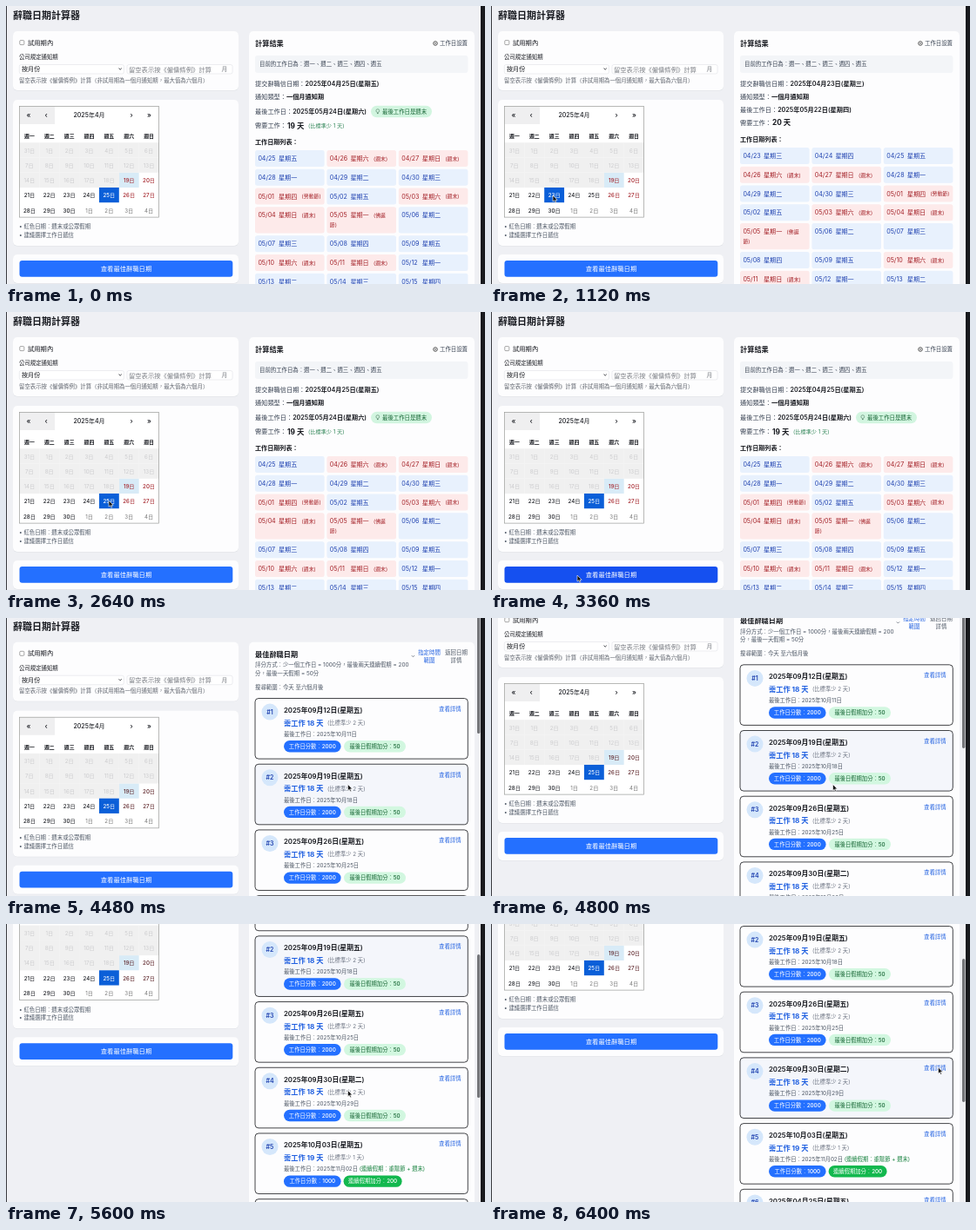
An HTML page that plays this animation: 550 by 320 pixels, repeating every 6.48 s.

```html
<!DOCTYPE html>
<html lang="zh-Hant">
<head>
<meta charset="utf-8">
<style>
html, body { margin: 0; width: 100%; height: 100%; overflow: hidden; background: #eff0f4; }
svg { display: block; width: 550px; height: 320px; font-family: Inter, "Noto Sans CJK TC", "Noto Sans CJK HK", "Noto Sans CJK JP", "Noto Sans CJK", sans-serif; }
text { white-space: pre; }
</style>
</head>
<body>
<svg id="stage" viewBox="0 0 550 320"></svg>
<script>
const LOOP = 6480, STEP = 80;
const INK = '#17191f', GREY = '#4b5563', BLUE = '#2470ff', LINK = '#1f5fe0', GREEN = '#166534', NAVY = '#1e40af', RED = '#a32027';
const stage = document.getElementById('stage');

function add(parent, tag, attrs = {}) {
  const node = document.createElementNS('http://www.w3.org/2000/svg', tag);
  for (const key in attrs) node.setAttribute(key, attrs[key]);
  parent.appendChild(node);
  return node;
}
const group = (parent, attrs) => add(parent, 'g', attrs);
const rect = (parent, x, y, width, height, fill, rx = 0, more = {}) =>
  add(parent, 'rect', { x, y, width, height, fill, rx, ...more });

// cy is the middle of the line; content is a string or a list of [string, attrs] runs.
function text(parent, x, cy, size, content, fill = INK, weight = 400, anchor = 'start') {
  const node = add(parent, 'text', { x, y: cy + size * 0.37, 'font-size': size, 'font-weight': weight, 'text-anchor': anchor });
  if (fill) node.setAttribute('fill', fill);
  if (typeof content === 'string') node.textContent = content;
  else for (const [run, attrs] of content) add(node, 'tspan', attrs).textContent = run;
  return node;
}

function panel(parent, x, y, w, h) {
  rect(parent, x, y + 0.6, w, h, '#dfe1e6', 5);
  rect(parent, x, y, w, h, '#fdfdfe', 5);
}

rect(stage, 0, 0, 550, 320, '#eff0f4');
const page = group(stage);
text(page, 8, 11, 11, '辭職日期計算器', INK, 700);

// Notice form
panel(page, 8, 29, 259, 68);
rect(page, 15.8, 39.6, 5, 5, '#fff', 1, { stroke: '#6b6b6b', 'stroke-width': 0.6 });
text(page, 25, 42, 7.3, '試用期內');
text(page, 15, 59, 6.4, '公司規定通知期', INK, 500);
const field = { stroke: '#d9dbe0', 'stroke-width': 0.5 };
rect(page, 15.3, 67.5, 120, 10.5, '#fff', 2, field);
rect(page, 139, 67.5, 121, 10.5, '#fff', 2, field);
text(page, 18, 72.7, 7.1, '按月份', INK, 500);
add(page, 'path', { d: 'M129.6 71.6l1.6 1.6 1.6-1.6', fill: 'none', stroke: INK, 'stroke-width': 0.8 });
text(page, 141, 72.9, 7.3, '留空表示按《僱傭條例》計算', '#7b7e85');
text(page, 247.5, 72.9, 6.8, '月', '#7b7e85');
text(page, 15, 85.2, 6.4, '留空表示按《僱傭條例》計算（非試用期為一個月通知期，最大值為六個月）', '#5f646d');

// Calendar
const COL = 160 / 7, ROW = 17.25, GRID_TOP = 157.2;
panel(page, 8, 108, 259, 168);
rect(page, 15.5, 115.5, 160, 127.6, '#fff');
rect(page, 15.5, 115.5, 40.5, 20.5, '#efeff0');
[['«', 26], ['‹', 46], ['›', 144], ['»', 164.5]].forEach(([mark, x]) => text(page, x, 125, 8, mark, INK, 500, 'middle'));
text(page, 95.5, 125.5, 7, '2025年4月', INK, 500, 'middle');
const colX = c => 15.5 + (c + 0.5) * COL;
[...'一二三四五六日'].forEach((d, c) => text(page, colX(c), 150, 5.9, '週' + d, INK, 700, 'middle'));
const redDays = group(page);
for (let i = 0; i < 35; i++) {
  const c = i % 7, r = Math.floor(i / 7), x = 15.5 + c * COL, y = GRID_TOP + r * ROW;
  const day = i === 0 ? 31 : i > 30 ? i - 30 : i;
  const off = i < 19, red = [19, 20, 26, 27].includes(i);
  if (off) rect(page, x, y, COL + 0.1, ROW + 0.1, '#f0f0f0');
  if (i === 19) rect(redDays, x, y, COL, ROW, '#d8ebf7');
  text(red ? redDays : page, colX(c), y + ROW / 2 + 0.4, 6.2, day + '日',
    red ? null : off ? '#cbcbcd' : i > 30 ? '#777' : INK, i > 30 || off ? 400 : 500, 'middle');
}
const picked = group(page);
rect(picked, 0, GRID_TOP + 3 * ROW, COL, ROW, '#0b5fd8');
const pickedText = text(picked, COL / 2, GRID_TOP + 3.5 * ROW + 0.4, 6.2, '25日', '#fff', 500, 'middle');
rect(page, 15.5, 115.5, 160, 127.6, 'none', 0, { stroke: '#9a9c99', 'stroke-width': 0.7 });
text(page, 15, 254, 6.4, '• 紅色日期：週末或公眾假期', GREY);
text(page, 15, 263.5, 6.4, '• 建議選擇工作日遞信', GREY);

panel(page, 8, 286, 259, 33);
const button = rect(page, 15.5, 293, 244.8, 18.7, BLUE, 3);
text(page, 138, 302.4, 7.3, '查看最佳辭職日期', '#fff', 500, 'middle');

panel(page, 279, 29, 259, 620);

function buildResult(startDay, lastDay, days, saving) {
  const g = group(page), shift = saving ? 3.4 : 0;
  const line = (y, label, value) => text(g, 286, y, 7.2, [[label, { fill: '#374151' }], [value, { 'font-weight': 600 }]]);
  text(g, 286, 43, 8.2, '計算結果', INK, 700);
  add(g, 'circle', { cx: 493, cy: 43, r: 2.3, fill: 'none', stroke: '#444', 'stroke-width': 0.9 });
  add(g, 'circle', { cx: 493, cy: 43, r: 0.8, fill: '#444' });
  text(g, 498, 43, 6.4, '工作日設置', '#374151');
  rect(g, 286, 57, 244.5, 20, '#f3f5f8', 3);
  text(g, 291, 67, 6.4, '目前的工作日為：週一、週二、週三、週四、週五', '#374151');
  line(89.5, '提交辭職信日期：', startDay);
  line(104.3, '通知類型：', '一個月通知期');
  line(saving ? 121.3 : 119, '最後工作日：', lastDay);
  if (saving) {
    rect(g, 419, 114.8, 70, 13.4, '#d2f5e0', 6.7);
    add(g, 'circle', { cx: 426.8, cy: 120.6, r: 1.9, fill: 'none', stroke: '#5d8a70', 'stroke-width': 0.7 });
    rect(g, 426, 123, 1.6, 1.1, '#5d8a70');
    text(g, 432, 121.3, 6.4, '最後工作日是週末', GREEN);
  }
  const workY = 134.3 + shift;
  text(g, 286, workY, 7.2, '需要工作：', '#374151');
  text(g, 323, workY, 8.3, days + ' 天', INK, 700);
  if (saving) text(g, 347, workY, 6.2, '(比標準少 1 天)', '#2f8556');
  text(g, 286, 153 + shift, 7.1, '工作日期列表：', INK, 600);

  const first = Number(startDay.slice(8, 10));
  let y = 163 + shift * 0.9;
  for (let r = 0; r < 8; r++) {
    let tall = false;
    const cells = [0, 1, 2].map(c => {
      const n = first + r * 3 + c, may = n > 30, day = may ? n - 30 : n;
      const week = (n - 20 + 7) % 7;
      const label = `${may ? '05' : '04'}/${String(day).padStart(2, '0')}`;
      const note = may && day === 1 ? '(勞動節)' : may && day === 5 ? '(佛誕' : week === 0 || week === 6 ? '(週末)' : '';
      if (note === '(佛誕') tall = true;
      return { x: 286 + c * 82.4, label, week, note };
    });
    const h = tall ? 30.2 : 19;
    for (const { x, label, week, note } of cells) {
      const fill = note ? RED : NAVY;
      rect(g, x, y, 79.6, h, note ? '#fdeaea' : '#e8f1fd', 2.5);
      text(g, x + 3.4, y + 9.5, 7.1, label, fill);
      text(g, x + 27, y + 9.5, 7.1, '星期' + '日一二三四五六'[week], fill, 500);
      if (note) text(g, x + 53.6, y + 9.7, 5.9, note, fill);
      if (note === '(佛誕') text(g, x + 3.4, y + 20.5, 5.9, '節)', fill);
    }
    y += h + 2.75;
  }
  return g;
}
const results = {
  25: buildResult('2025年04月25日(星期五)', '2025年05月24日(星期六)', 19, true),
  23: buildResult('2025年04月23日(星期三)', '2025年05月22日(星期四)', 20, false)
};

// Ranked dates
const best = group(page);
text(best, 286, 43, 8.2, '最佳辭職日期', INK, 700);
text(best, 286, 55.3, 6.4, '評分方式：少一個工作日 = 1000分，最後兩天連續假期 = 200', GREY);
text(best, 286, 65, 6.4, '分，最後一天假期 = 50分', GREY);
add(best, 'path', { d: 'M465.8 44.4l1.6 1.6 1.6-1.6', fill: 'none', stroke: GREY, 'stroke-width': 0.7 });
[['指定時間', '範圍', 486, LINK], ['返回日期', '詳情', 517, GREY]].forEach(([a, b, x, fill]) => {
  text(best, x, 41, 6.4, a, fill, 400, 'middle');
  text(best, x, 50, 6.4, b, fill, 400, 'middle');
});
text(best, 286, 80.5, 6.4, '搜尋範圍：今天 至六個月後', GREY);

function pill(parent, x, y, w, label, bg, fill) {
  rect(parent, x, y, w, 13.4, bg, 6.7);
  text(parent, x + w / 2, y + 6.7, 6.3, label, fill, 500, 'middle');
}
const cards = [
  ['2025年09月12日(星期五)', 18, '2025年10月11日'],
  ['2025年09月19日(星期五)', 18, '2025年10月18日'],
  ['2025年09月26日(星期五)', 18, '2025年10月25日'],
  ['2025年09月30日(星期二)', 18, '2025年10月29日'],
  ['2025年10月03日(星期五)', 19, '2025年11月02日', ' (連續假期：重陽節 + 週末)'],
  ['2025年04月25日(星期五)', 19, '2025年05月24日']
].map(([date, days, last, streak], i) => {
  const g = group(best, { transform: `translate(0 ${93.8 + i * 75.7})` });
  const box = rect(g, 286, 0, 244.3, 69.6, '#fdfdfe', 4, { stroke: '#15161a', 'stroke-width': 0.8 });
  add(g, 'circle', { cx: 303, cy: 15.6, r: 9.5, fill: '#d5e7fb' });
  text(g, 303, 15.6, 7, '#' + (i + 1), NAVY, 600, 'middle');
  text(g, 319, 13.5, 7.8, date, INK, 600);
  text(g, 319, 28, 8.2, `需工作 ${days} 天`, LINK, 700);
  text(g, 369, 28.2, 6.3, `(比標準少 ${20 - days} 天)`, '#6b7280');
  text(g, 319, 41, 6.3, [['最後工作日：' + last, { fill: GREY }], [streak || '', { fill: '#15803d' }]]);
  pill(g, 319, 48.5, 65.6, '工作日分數：' + (days === 18 ? 2000 : 1000), BLUE, '#fff');
  if (streak) pill(g, 387.6, 48.5, 67, '連續假期加分：200', '#12b84e', '#fff');
  else pill(g, 388, 48.5, 71, '最後日假期加分：50', '#d2f7e0', GREEN);
  text(g, 497, 12, 6.4, '查看詳情', LINK, 500);
  return box;
});

// Window edges, scrollbar and pointer
rect(stage, 0, 0, 1, 320, '#3a3b40');
rect(stage, 545, 0, 5, 320, '#18191d');
const thumb = rect(stage, 541, 0, 3.4, 165, '#75767a', 1.7);
const pointer = add(stage, 'path', {
  d: 'M0 0V7.2L1.7 5.7 2.8 8.2 4 7.7 2.9 5.3H5.2Z', fill: '#111', stroke: '#fff', 'stroke-width': 0.6
});

const route = [
  [80, 300, 330], [320, 190, 272], [400, 190, 272], [880, 71, 218], [1360, 71, 218], [1480, 69, 220],
  [1600, 71, 218], [1760, 71, 218], [2160, 118, 217], [2880, 118, 217], [3360, 99, 303],
  [4000, 99, 303], [4240, 392.5, 191.5], [5840, 392.5, 191.5], [6400, 513.5, 165]
];
const clamp = v => Math.min(1, Math.max(0, v));
const mix = (a, b, p) => a + (b - a) * p;
const smooth = p => p * p * (3 - 2 * p);
const inOutCubic = p => p < 0.5 ? 4 * p ** 3 : 1 - 4 * (1 - p) ** 3;

function pointerAt(t) {
  const next = route.findIndex(k => k[0] > t);
  if (next === 0) return route[0].slice(1);
  if (next < 0) return route[route.length - 1].slice(1);
  const [t0, x0, y0] = route[next - 1], [t1, x1, y1] = route[next];
  const p = smooth((t - t0) / (t1 - t0));
  return [mix(x0, x1, p), mix(y0, y1, p)];
}

function scrollAt(t) {
  const start = 40 * inOutCubic(clamp((t - 4400) / 400));
  return start + 127 * (1 - (1 - clamp((t - 4960) / 800)) ** 1.5);
}

const show = (node, on) => node.setAttribute('display', on ? 'inline' : 'none');

function render(t) {
  const day = t >= 1120 && t < 2640 ? 23 : 25;
  const ranked = t >= 3600;
  const scroll = scrollAt(t);
  const [x, y] = pointerAt(t);
  page.setAttribute('transform', `translate(0 ${-scroll})`);
  picked.setAttribute('transform', `translate(${15.5 + (day - 21) * COL} 0)`);
  pickedText.textContent = day + '日';
  redDays.setAttribute('fill', ranked ? '#5b2226' : RED);
  for (const key in results) show(results[key], !ranked && Number(key) === day);
  show(best, ranked);
  const overButton = scroll === 0 && x > 15 && x < 260 && y > 293 && y < 312;
  button.setAttribute('fill', overButton ? '#1550f0' : BLUE);
  const hovered = t < 4160 ? -1 : t < 5760 ? 1 : 3;
  cards.forEach((box, i) => box.setAttribute('fill', i === hovered ? '#f4f6fb' : '#fdfdfe'));
  show(thumb, t >= 4480);
  thumb.setAttribute('y', -32 + 0.434 * (scroll - 1));
  pointer.setAttribute('transform', `translate(${x} ${y})`);
}

function tick(now) {
  render(Math.floor((now % LOOP) / STEP) * STEP);
  requestAnimationFrame(tick);
}
render(0);
requestAnimationFrame(tick);
</script>
</body>
</html>
```
